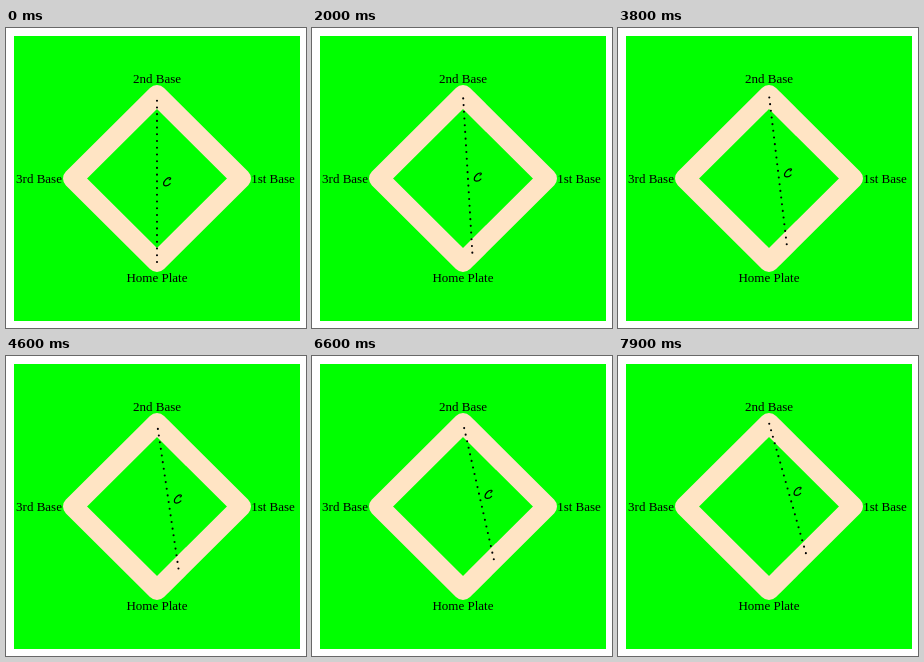
Recreate the animation shown at these times as an HTML page. Size 300 px wide and 300 px high, loop 8 s.

```html
<!DOCTYPE html>
<html lang="en">
<head>
<meta charset="utf-8">
<title>Baseball diamond</title>
<style>
  html, body { margin: 0; width: 100%; height: 100%; overflow: hidden; background: #fff; }
  svg { display: block; width: 100vw; height: 100vh; }
  text { font: 13px "Liberation Serif", "Times New Roman", serif; text-anchor: middle; }
  .path { fill: none; stroke: #ffe4c4; stroke-width: 20; stroke-linejoin: round; }
  .throw { stroke: #000; stroke-width: 2.1; stroke-linecap: round; stroke-dasharray: 0 6.72; }
  .label { fill: none; stroke: #000; stroke-width: 1.15; stroke-linecap: round; }
</style>
</head>
<body>
<svg viewBox="0 0 300 300">
  <rect x="8" y="8" width="286" height="285" fill="#0f0"/>
  <path class="path" d="M151 67L235 150.5L151 234L67 150.5Z"/>
  <text x="151" y="55">2nd Base</text>
  <text x="267" y="155">1st Base</text>
  <text x="151" y="254">Home Plate</text>
  <text x="33" y="155">3rd Base</text>
  <line class="throw" id="throw" x1="151" y1="234" x2="151" y2="67"/>
  <!-- script letter C -->
  <g id="label"><path class="label" d="M1.8 -2C3 -2.2 4 -3.8 2.6 -4C-.4 -4.4 -3.8 -.4 -3.8 2C-3.8 4.8 .4 4.8 2.8 2"/></g>
</svg>
<script>
  const LOOP = 8000, STEP = 100;
  const SHIFT = 84 / 180; // pixels along each axis per step
  const line = document.getElementById('throw');
  const label = document.getElementById('label');

  function draw(now) {
    const d = Math.floor(now % LOOP / STEP) * SHIFT;
    line.setAttribute('x1', 151 + d);
    line.setAttribute('y1', 234 - d);
    label.setAttribute('transform', `translate(${161.4 + d / 2} ${153.7 - d / 2})`);
  }

  function tick() {
    draw(performance.now());
    requestAnimationFrame(tick);
  }
  tick();
</script>
</body>
</html>
```
